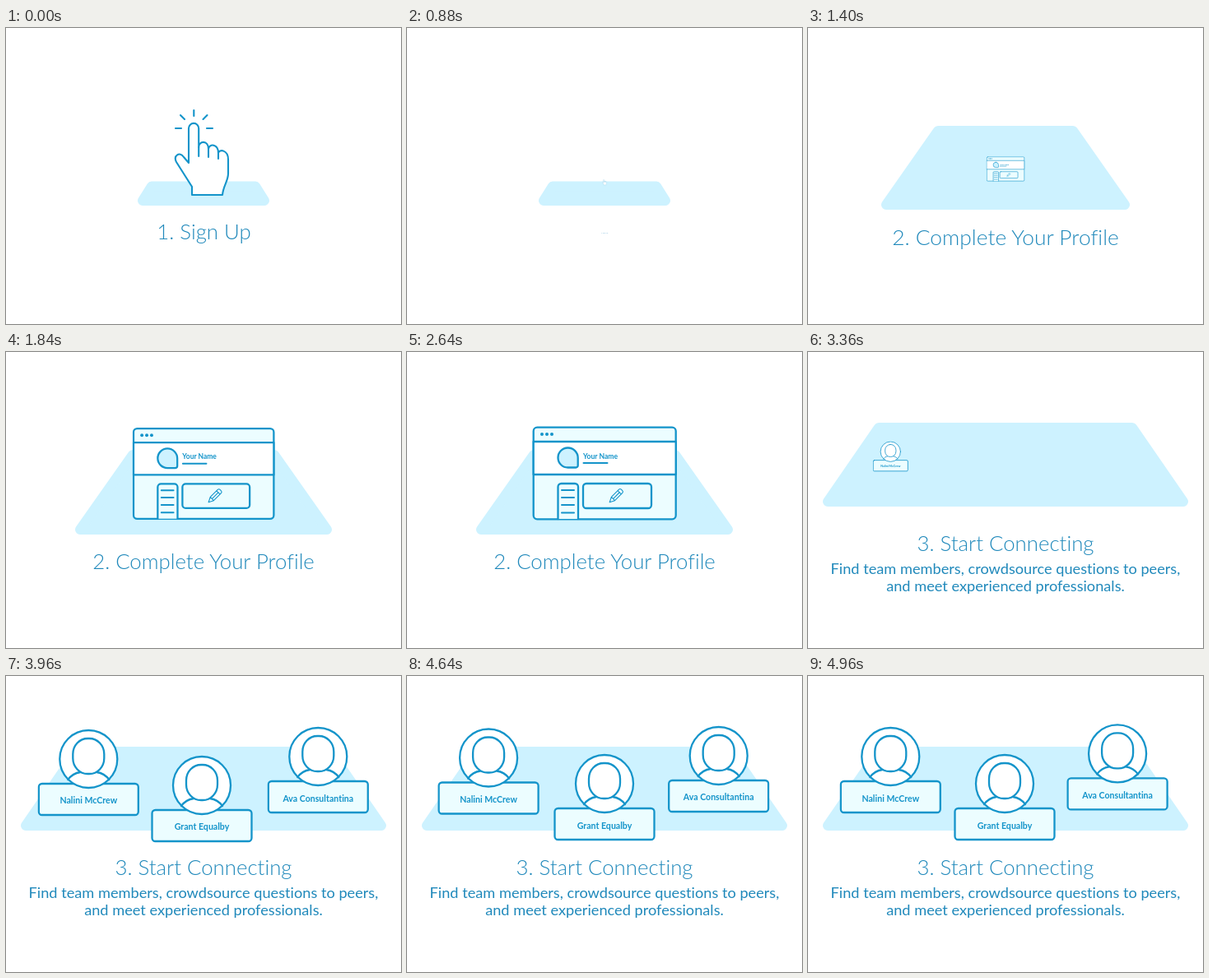
Animation of 480 by 360 pixels, one loop 5000 ms. Source, as an HTML page without scripts:

```html
<!DOCTYPE html>
<html lang="en">
<head>
<meta charset="utf-8">
<title>Three steps</title>
<style>
  html, body { margin: 0; height: 100%; overflow: hidden; background: #fff; }
  svg { display: block; width: 100vw; height: 100vh; }
  svg { --line: #1494ca; --ink: #2089bb; --sky: #cdf2ff; --ice: #ecfdff; }

  .anim { animation: 5s ease-in-out infinite both; }
  .line { fill: none; stroke: var(--line); stroke-width: 2.3; stroke-linecap: round; stroke-linejoin: round; }
  .white { fill: #fff; }
  .ice { fill: var(--ice); }
  .sky { fill: var(--sky); }
  text { font-family: Lato, "Open Sans", sans-serif; fill: var(--ink); text-anchor: middle; font-variant-ligatures: none; }
  .title { font-size: 25.8px; font-weight: 300; }
  .sub { font-size: 18.2px; }
  .label { font-size: 10.6px; font-weight: 700; fill: var(--line); }

  .floor { fill: var(--sky); stroke: var(--sky); stroke-width: 12; stroke-linejoin: round; animation-name: floor; }
  .rays { transform-origin: 228px 122px; animation-name: rays; }
  .hand { transform-origin: 240px 190px; animation-name: leave-one; }
  .title-one { transform-origin: 240px 249px; animation-name: leave-one; }
  .title-two { transform-origin: 240px 255px; animation-name: title-two; }
  .browser { transform-origin: 240px 180px; animation-name: browser; }
  .step-three { animation-name: show-three; animation-timing-function: step-end; }
  .text-three { transform-origin: 240px 262px; animation-name: text-three; }
  .pop { animation-name: pop; animation-delay: var(--wait); }
  .drift { animation-name: drift; }

  @keyframes floor {
    0%, 20% { d: path("M166 210L177 192.5H303L314 210Z"); }
    22.4% { d: path("M121 212L167 150H313L359 212Z"); }
    24.4% { d: path("M88 216L153 124H327L392 216Z"); }
    28% { d: path("M95 215L158 125H322L385 215Z"); }
    30.8% { d: path("M89.5 216L154 125H326L390.5 216Z"); }
    32.8%, 56.4% { d: path("M90 216L154 125H326L390 216Z"); }
    60.8% { d: path("M13 183L77 88H403L467 183Z"); }
    63.6% { d: path("M27 182L88 92H392L453 182Z"); }
    66.4%, 100% { d: path("M24 182L86 92H394L456 182Z"); }
  }
  @keyframes rays {
    0% { transform: scale(1); }
    3.2% { transform: scale(1.08); }
    7.2%, 100% { transform: scale(0); }
  }
  @keyframes leave-one {
    0%, 14.4% { transform: scale(1); }
    18.4%, 100% { transform: scale(0); }
  }
  @keyframes title-two {
    0%, 21.6% { transform: scale(0); }
    25.6% { transform: scale(1.08); }
    28% { transform: scale(1.023); }
    30.4% { transform: scale(.99); }
    32.8%, 53.6% { transform: scale(1); }
    57.6%, 100% { transform: scale(0); }
  }
  @keyframes browser {
    0%, 27.2% { transform: scale(0); animation-timing-function: linear; }
    28% { transform: scale(.257); animation-timing-function: ease-out; }
    32% { transform: scale(1.06); }
    34.4% { transform: scale(1.035); }
    36.8% { transform: scale(.985); }
    39.2%, 53.6% { transform: scale(1); }
    57.6%, 100% { transform: scale(0); }
  }
  @keyframes show-three {
    0% { visibility: hidden; }
    57.6%, 100% { visibility: visible; }
  }
  @keyframes text-three {
    0%, 58.4% { transform: scale(0); }
    62% { transform: scale(1.06); }
    64.4% { transform: scale(.985); }
    66.8%, 100% { transform: scale(1); }
  }
  @keyframes pop {
    0%, 66.4% { transform: scale(0); animation-timing-function: linear; }
    67.2% { transform: scale(.34); animation-timing-function: ease-out; }
    70.4% { transform: scale(1.08); }
    72.8% { transform: scale(.98); }
    74.8%, 100% { transform: scale(1); }
  }
  @keyframes drift {
    0%, 79.2% { transform: translate(0, 0); }
    92.8% { transform: translate(var(--mid)); }
    99.2%, 100% { transform: translate(var(--end)); }
  }
</style>
</head>
<body>
<svg viewBox="0 0 480 360">
  <defs>
    <g id="person" class="line">
      <rect class="ice" x="-60.5" y="-1" width="121" height="38" rx="4"/>
      <circle class="white" cy="-31" r="35"/>
      <path d="M-10-15C-17-14-22-10-25-6M10-15C17-14 22-10 25-6"/>
      <rect class="white" x="-19" y="-56" width="38" height="43" rx="18" ry="19"/>
    </g>
  </defs>

  <path class="floor anim" d="M166 210L177 192.5H303L314 210Z"/>

  <!-- Step 1 -->
  <g class="line" style="stroke-width:2.1">
    <path class="rays anim" d="M228.3 100V107M212 106L217 111M244.5 106L239.5 111M206 122H213M244 122H251"/>
    <g class="hand anim">
      <path class="white" d="M222 164V122a6.1 6.1 0 0 1 12.2 0V145C234 137 246 136 246 147C247 140 258 141 258 152C259 147 270 148 270 160V177C270 186 264 192 263 203H226V193L207 163C203 155 211 150 216 157Z"/>
      <path d="M234.2 145V156M246 147V157M258 152V159"/>
    </g>
  </g>
  <text class="title title-one anim" x="240.5" y="257">1. Sign Up</text>

  <!-- Step 2 -->
  <g class="browser anim">
    <g class="line">
      <rect class="ice" x="153.7" y="91.7" width="173" height="111.6" rx="4.5"/>
      <path class="white" d="M153.7 109H326.7V149H153.7Z"/>
      <path class="sky" d="M195.5 116.5a12.2 12.2 0 0 1 12.2 12.2V138a2.5 2.5 0 0 1-2.5 2.5H195.5a12 12 0 0 1 0-24Z"/>
      <path d="M214.5 135H243.5" style="stroke-width:2"/>
      <path class="ice" d="M183.5 203V164a4 4 0 0 1 4-4H204a4 4 0 0 1 4 4V203"/>
      <path d="M188 168H203M188 177H203M188 186H203M188 195.5H203" style="stroke-width:2"/>
      <rect class="ice" x="214" y="160" width="83" height="30" rx="4"/>
      <path transform="translate(254 175) rotate(45)" d="M-3-8a2 2 0 0 1 2-2H1a2 2 0 0 1 2 2V5L0 11L-3 5ZM-3-6H3M-3 5H3M0-6V5" style="stroke-width:1.1"/>
    </g>
    <g fill="#1494ca">
      <circle cx="164" cy="100" r="2"/>
      <circle cx="170" cy="100" r="2"/>
      <circle cx="176" cy="100" r="2"/>
    </g>
    <text class="label" x="235" y="129.5" style="font-size:8.6px">Your Name</text>
  </g>
  <text class="title title-two anim" x="240" y="263.5">2. Complete Your Profile</text>

  <!-- Step 3 -->
  <g class="step-three anim">
    <g class="text-three anim">
      <text class="title" x="240" y="242">3. Start Connecting</text>
      <text class="sub" x="240" y="269.7">Find team members, crowdsource questions to peers,</text>
      <text class="sub" x="240" y="291">and meet experienced professionals.</text>
    </g>
    <g transform="translate(100.3 132)">
      <g class="drift anim" style="--mid:-1.2px,-1.5px; --end:0px,-3px">
        <g class="pop anim" style="--wait:0s">
          <use href="#person"/>
          <text class="label" y="23.5">Nalini McCrew</text>
        </g>
      </g>
    </g>
    <g transform="translate(238 164)">
      <g class="drift anim" style="--mid:2px,-2px; --end:1px,-2px">
        <g class="pop anim" style="--wait:.08s">
          <use href="#person"/>
          <text class="label" y="23.5">Grant Equalby</text>
        </g>
      </g>
    </g>
    <g transform="translate(379.3 129)">
      <g class="drift anim" style="--mid:-.6px,-1px; --end:-3.2px,-3.6px">
        <g class="pop anim" style="--wait:.16s">
          <use href="#person"/>
          <text class="label" y="23.5">Ava Consultantina</text>
        </g>
      </g>
    </g>
  </g>
</svg>
</body>
</html>
```
